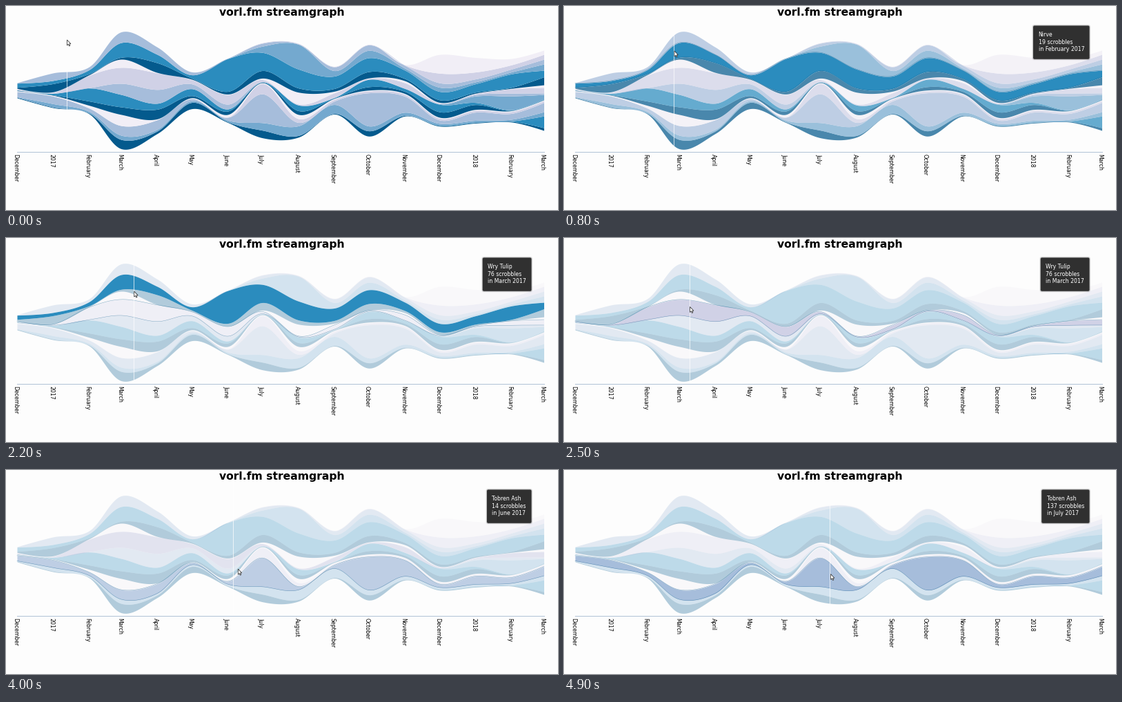
A matplotlib script that plays this animation: 800x295 px, repeating every 5 s.

```python
import numpy as np
import matplotlib.pyplot as plt
from matplotlib.animation import FuncAnimation
from matplotlib.patches import FancyBboxPatch, Polygon

W, H, DPI = 800, 295, 100
FRAMES, STEP = 50, 100
LEFT, RIGHT, CENTER_Y = 16, 779.5, 122
PX_PER_PLAY = 0.304
DIM, FADE_MS, GUIDE_LAG = 0.3, 250, 50

DARK, BLUE, MID, SOFT, LILAC, PALE = (
    "#045a8d", "#2b8cbe", "#74a9cf", "#a6bddb", "#d0d1e6", "#f1eef6")

# Sixteen months, each placed at its first day.
DATES = np.arange("2016-12", "2018-04", dtype="datetime64[M]")
DAYS = (DATES.astype("datetime64[D]") - np.datetime64("2016-12-01")).astype(float)
MONTH_X = LEFT + (RIGHT - LEFT) * DAYS / DAYS[-1]
YEAR = ("January February March April May June July August September "
        "October November December").split()
MONTHS = [YEAR[(i - 1) % 12] for i in range(len(DATES))]
KEYS = "dec16 jan feb mar apr may jun jul aug sep oct nov dec jan18 feb18 mar18".split()

bands = []


def add_band(color, quiet, since="dec16", **standout):
    """Stack a band: a quiet level from `since` on, lifted in its standout months."""
    first = KEYS.index(since)
    plays = [standout.get(key, quiet) if i >= first else 0 for i, key in enumerate(KEYS)]
    bands.append((color, np.array(plays, float)))
    return len(bands) - 1


add_band(DARK, 3, mar=44, apr=12, may=30, jul=36, aug=8, oct=25, mar18=13)
add_band(BLUE, 2, since="dec", mar18=56)
add_band(MID, 8, dec16=2, jan=16, mar=20, jul=36, aug=46, sep=43, oct=23, nov=15, mar18=20)
RAPPER = add_band(SOFT, 16, dec16=25, jan=36, mar=46, apr=46, may=10, jun=14, jul=137,
                  oct=158, nov=76, jan18=39, feb18=28, mar18=44)
add_band(LILAC, 9, since="jul", jul=49, aug=18)
add_band(PALE, 4, feb=13, mar=53, jun=13, aug=20)
add_band(DARK, 2, feb=20, mar=36, apr=46, may=10, jun=16, aug=18, oct=16, nov=10,
         dec=26, jan18=23)
add_band(BLUE, 2, jan=7, feb=62, mar=59, apr=28, may=33, jun=10, aug=27, oct=35, nov=14,
         dec=36, jan18=10)
add_band(MID, 2, since="dec", jan18=31, feb18=66, mar18=21)
add_band(SOFT, 1, mar=53, apr=66, may=23, jun=23, jan18=7, feb18=13, mar18=7)
DUO = add_band(LILAC, 4, feb=59, mar=76, apr=79, may=20, jun=46, jul=10, sep=21, nov=26,
               feb18=21, mar18=26)
add_band(PALE, 2, mar=39, jul=7, aug=56, sep=8, nov=10, mar18=13)
add_band(DARK, 5, jan=39, mar=9, apr=46, jun=13, jul=36, aug=20, sep=13, oct=30, nov=10,
         dec=12, mar18=38)
SINGER = add_band(BLUE, 40, dec16=20, jan=15, feb=19, mar=70, may=16, jun=156, jul=86,
                  aug=90, sep=59, oct=66, feb18=64, mar18=31)
add_band(MID, 9, since="jul", jul=30, aug=118, sep=26, oct=35, dec=20, mar18=30)
add_band(SOFT, 14, dec16=2, jan=36, mar=51, apr=35, jun=2, aug=2, sep=18, oct=26,
         dec=21, mar18=23)
add_band(LILAC, 2, since="jul", dec=46, jan18=33, feb18=20, mar18=23)
add_band(PALE, 2, since="nov", dec=89, jan18=69, feb18=30, mar18=20)

ARTISTS = {SINGER: "Nirve", DUO: "Wry Tulip", RAPPER: "Tobren Ash"}
HOVERS = [(700, SINGER), (2200, DUO), (3850, RAPPER)]


def cardinal(values, samples=20):
    """Cardinal spline through values, sampled evenly in its parameter."""
    tangent = np.gradient(values)
    tangent[[0, -1]] = 0
    t = np.linspace(0, 1, samples, endpoint=False)[:, None]
    p0, p1, m0, m1 = values[:-1], values[1:], tangent[:-1], tangent[1:]
    curve = ((2 * t**3 - 3 * t**2 + 1) * p0 + (t**3 - 2 * t**2 + t) * m0
             + (3 * t**2 - 2 * t**3) * p1 + (t**3 - t**2) * m1)
    return np.append(curve.T.ravel(), values[-1])


def px(size):
    return size * 72 / DPI


plt.rcParams["font.family"] = "DejaVu Sans"
fig = plt.figure(figsize=(W / DPI, H / DPI), dpi=DPI, facecolor="#fdfdfd")
ax = fig.add_axes([0, 0, 1, 1])
ax.set(xlim=(0, W), ylim=(H, 0))
ax.axis("off")

ax.text(399.5, 14.4, "vorl.fm streamgraph", size=px(15.6), weight="bold", ha="center")
ax.plot([LEFT, RIGHT], [210.5, 210.5], color="#b2c3d6", lw=px(1))
for x, month, date in zip(MONTH_X, MONTHS, DATES):
    label = str(date)[:4] if month == "January" else month
    ax.text(x - 2.6, 213.7, label, size=px(7.8), rotation=270, ha="center", va="top")

# Silhouette stacking: the whole stream is centred on one line.
heights = np.array([plays for _, plays in bands]) * PX_PER_PLAY
edges = CENTER_Y + heights.sum(axis=0) / 2 - np.vstack(
    [np.zeros(len(MONTHS)), np.cumsum(heights, axis=0)])
curve_x = cardinal(MONTH_X)
curves = [cardinal(edge) for edge in edges]
areas = [ax.fill_between(curve_x, low, high, color=color, lw=0)
         for (color, _), low, high in zip(bands, curves, curves[1:])]
outlines = {
    band: [ax.plot(curve_x, curves[band + k], color=DARK, alpha=0.5, lw=px(0.5))[0]
           for k in (0, 1)]
    for band in ARTISTS}

guide, = ax.plot([], [], color="white", lw=px(1), alpha=0.7)


def rounded_box(grow, color, alpha, z):
    box = FancyBboxPatch((0, 28.5 - grow), 1, 48.3 + 2 * grow,
                         boxstyle=f"round,pad=0,rounding_size={2 + grow}",
                         fc=color, ec="none", alpha=alpha, zorder=z)
    box.grow = grow
    return ax.add_patch(box)


tip_boxes = [rounded_box(1.6, "black", 0.1, 5), rounded_box(0.8, "black", 0.18, 5),
             rounded_box(0, "#303030", 1, 6)]
tip_text = ax.text(754, 52.3, "", size=px(7.8), color="white", ha="right", va="center",
                   multialignment="left", linespacing=1.2, zorder=7)

ARROW = 0.92 * np.array(
    [(0, 0), (0, 8.6), (2, 6.9), (3.3, 9.7), (4.7, 9.1), (3.4, 6.4), (5.9, 6.2)])
cursor = ax.add_patch(Polygon(ARROW, fc="white", ec="#333333", lw=px(0.8), zorder=8))

# Cursor stops as (ms, x, y); it eases from each to the next.
STOPS = np.array([
    (0, 88.5, 49), (700, 160, 65), (1200, 160, 65), (1550, 187.5, 65), (2000, 187.5, 65),
    (2500, 182.5, 99.5), (2600, 182.5, 99.5), (3300, 235, 107), (3550, 235, 107),
    (3600, 293, 117), (4150, 346, 149), (4300, 346, 149), (4900, 386.5, 150.5)])


def cursor_at(t):
    t = np.clip(t, 0, STOPS[-1, 0])
    i = min(np.searchsorted(STOPS[:, 0], t, side="right"), len(STOPS) - 1)
    (t0, *start), (t1, *end) = STOPS[i - 1], STOPS[i]
    u = (t - t0) / (t1 - t0)
    return np.array(start) + (np.array(end) - start) * u * u * (3 - 2 * u)


def opacity(band, t):
    """Each hover fades its own band in and all the others back."""
    level = 1.0
    for start, target in HOVERS:
        goal = 1.0 if band == target else DIM
        level += (goal - level) * min(max((t - start) / FADE_MS, 0), 1)
    return level


def hovered_band(t):
    return next((band for start, band in reversed(HOVERS) if t >= start), None)


def show_tooltip(band, guide_x):
    visible = band is not None
    for artist in (*tip_boxes, tip_text):
        artist.set_visible(visible)
    if not visible:
        return
    month = np.searchsorted(MONTH_X, guide_x) - 1
    plays = int(bands[band][1][month])
    tip_text.set_text(
        f"{ARTISTS[band]}\n{plays} scrobbles\nin {MONTHS[month]} {str(DATES[month])[:4]}")
    left = tip_text.get_window_extent().x0 - 7.5
    for box in tip_boxes:
        box.set_x(left - box.grow)
        box.set_width(761.5 - left + 2 * box.grow)


def draw(frame):
    t = frame * STEP
    band = hovered_band(t)
    for i, area in enumerate(areas):
        area.set_alpha(opacity(i, t))
    for i, lines in outlines.items():
        for line in lines:
            line.set_visible(i == band)
    guide_x = cursor_at(t - GUIDE_LAG)[0] - 1
    guide.set_data([guide_x, guide_x], [2, 208])
    show_tooltip(band, guide_x)
    cursor.set_xy(ARROW + cursor_at(t))
    return []


anim = FuncAnimation(fig, draw, frames=FRAMES, interval=STEP, repeat=True, repeat_delay=0)
plt.show()
```
